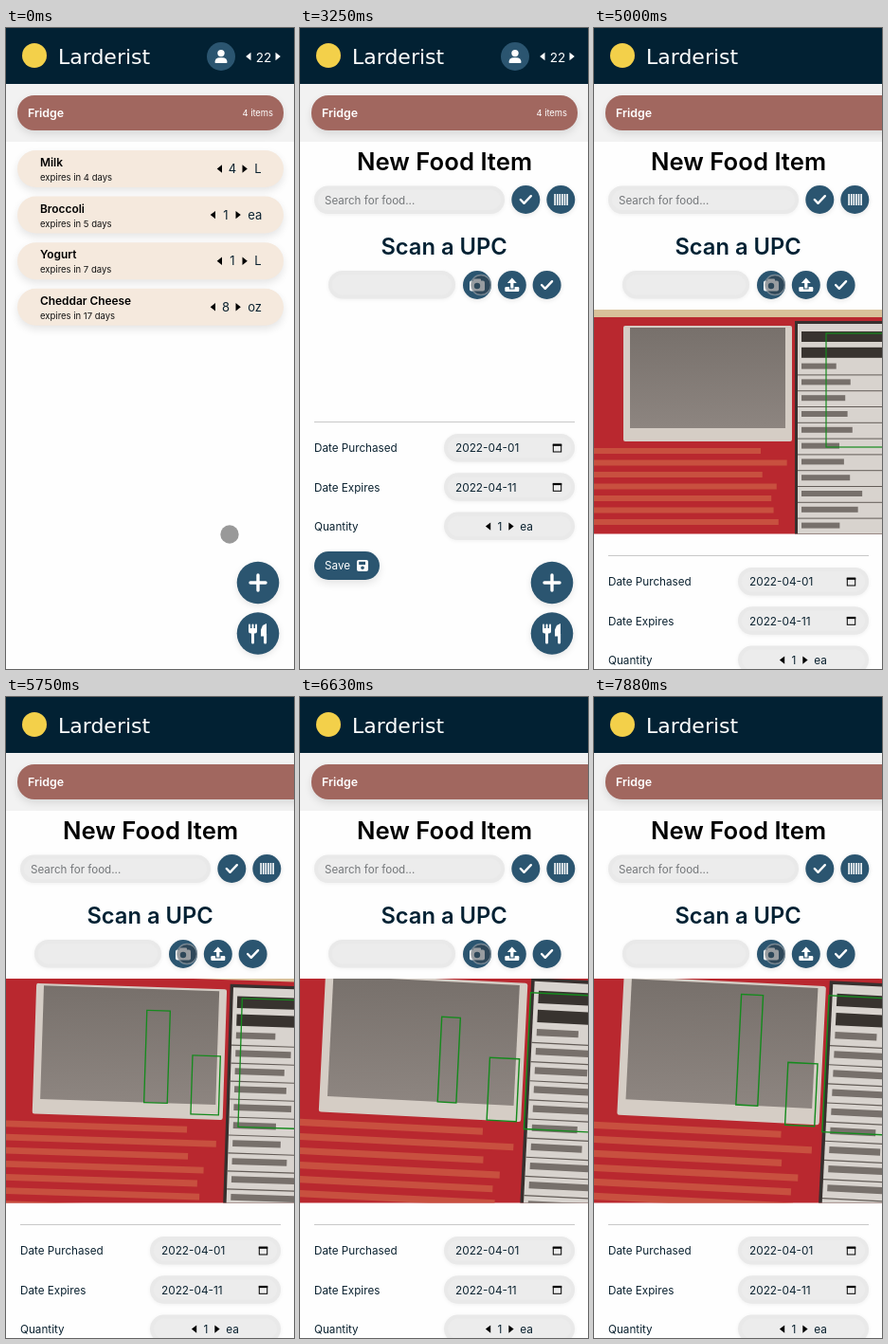
An HTML page with a canvas for the animation above (8000 ms loop, 304 px wide and 676 px high).

```html
<!DOCTYPE html>
<html lang="en">
<head>
<meta charset="utf-8">
<title>Pantry list</title>
<style>
html, body { margin: 0; width: 100%; height: 100%; overflow: hidden; background: #fff; }
canvas { display: block; width: 304px; height: 676px; }
</style>
</head>
<body>
<canvas id="stage"></canvas>
<script>
const W = 304, H = 676, LOOP = 8000, STEP = 125, LIVE = 4250;
const NAVY = '#022133', BLUE = '#2b5570', INK = '#0b2230', PAPER = '#fefefe';
const UI = 'Inter, "Open Sans", sans-serif';
const canvas = document.getElementById('stage');
const c = canvas.getContext('2d');
const dpr = window.devicePixelRatio || 1;
canvas.width = W * dpr;
canvas.height = H * dpr;

const clamp = v => Math.max(0, Math.min(1, v));
const ease = k => k * k * (3 - 2 * k);
const span = (t, a, b) => ease(clamp((t - a) / (b - a)));
const random = seed => {
  const v = Math.sin(seed * 12.9898) * 43758.5453;
  return v - Math.floor(v);
};

function rect(x, y, w, h, color) {
  c.fillStyle = color;
  c.fillRect(x, y, w, h);
}

function pill(x, y, w, h, color, r = h / 2) {
  c.beginPath();
  c.roundRect(x, y, w, h, r);
  c.fillStyle = color;
  c.fill();
}

function disc(x, y, r, color) {
  c.beginPath();
  c.arc(x, y, r, 0, Math.PI * 2);
  c.fillStyle = color;
  c.fill();
}

function poly(points, color) {
  c.beginPath();
  points.forEach(([x, y]) => c.lineTo(x, y));
  c.closePath();
  c.fillStyle = color;
  c.fill();
}

function line(points, color, width) {
  c.beginPath();
  points.forEach(([x, y]) => c.lineTo(x, y));
  c.strokeStyle = color;
  c.lineWidth = width;
  c.lineCap = c.lineJoin = 'round';
  c.stroke();
}

function text(s, x, y, size, { color = INK, weight = 400, align = 'left', font = UI } = {}) {
  c.font = `${weight} ${size}px ${font}`;
  c.fillStyle = color;
  c.textAlign = align;
  c.fillText(s, x, y);
}

function shadowed(draw, blur = 8, dy = 4, alpha = 0.1) {
  c.save();
  c.shadowColor = `rgba(0,0,0,${alpha})`;
  c.shadowBlur = blur * dpr;
  c.shadowOffsetY = dy * dpr;
  draw();
  c.restore();
}

const arrow = (x, y, dir, color = '#000') =>
  poly([[x - 2.5 * dir, y - 4.2], [x + 2.8 * dir, y], [x - 2.5 * dir, y + 4.2]], color);

const icons = {
  check() { line([[-5.5, 0], [-1.8, 3.8], [5.5, -3.8]], '#fff', 2.4); },
  bars() { for (let i = 0; i < 6; i++) rect(-7 + i * 2.6, -6, 1.6, 12, '#fff'); },
  camera() {
    pill(-8, -4.5, 16, 11, '#fff', 2);
    pill(-4, -6.5, 8, 4, '#fff', 1);
    disc(0, 1, 3.2, BLUE);
  },
  upload() {
    poly([[0, -7.5], [5, -2], [-5, -2]], '#fff');
    pill(-7.5, 2, 15, 5, '#fff', 1.2);
    rect(-2.8, 1.5, 5.6, 3, BLUE);
    rect(-1.6, -3, 3.2, 6.5, '#fff');
  },
  plus() {
    line([[-8, 0], [8, 0]], '#fff', 3.4);
    line([[0, -8], [0, 8]], '#fff', 3.4);
  },
  cutlery() {
    for (let x = -9; x < 0; x += 3.5) line([[x, -9], [x, -4]], '#fff', 2);
    pill(-10, -5.5, 9, 5.5, '#fff', 2.5);
    line([[-5.5, -2], [-5.5, 9.5]], '#fff', 3);
    poly([[9, -10.5], [9, 3], [3, 3], [3, -4], [5, -8.5]], '#fff');
    line([[7.6, 1], [7.6, 9.5]], '#fff', 3);
  },
  person() {
    disc(0, -3.4, 3.7, '#fff');
    pill(-6.5, 1.2, 13, 5.8, '#fff', [5, 5, 1, 1]);
  },
  save() {
    pill(-6, -6, 12, 12, '#fff', 2);
    rect(-3.8, -4.2, 6.8, 3.2, BLUE);
    disc(0, 2.3, 1.8, BLUE);
  },
  calendar() {
    c.strokeStyle = '#000';
    c.lineWidth = 1;
    c.strokeRect(-4.2, -3.6, 8.4, 7.6);
    rect(-4.7, -4.4, 9.4, 2.2, '#000');
  }
};

function icon(name, x, y) {
  c.save();
  c.translate(x, y);
  icons[name]();
  c.restore();
}

function button(name, x, y, r = 15) {
  shadowed(() => disc(x, y, r, BLUE), r / 3, r / 10);
  icon(name, x, y);
}

function stepper(x, y, count, unit, size) {
  const gap = size + 0.5;
  arrow(x - gap, y, -1);
  text(count, x, y + size * 0.36, size, { align: 'center' });
  arrow(x + gap - 0.5, y, 1);
  text(unit, x + gap * 1.72, y + size * 0.36, size);
}

function header(wide) {
  rect(0, 0, W, 59, NAVY);
  disc(30, 29, 13, '#f3d04a');
  text('Larderist', 55, 38, 22, { color: '#fff', font: '"DejaVu Sans", sans-serif' });
  if (!wide) {
    disc(227, 30, 15, BLUE);
    icon('person', 227, 30);
    arrow(256, 30, -1, '#fff');
    text('22', 272, 35.5, 13.5, { color: '#fff', align: 'center' });
    arrow(287, 30, 1, '#fff');
  }
  rect(0, 59, W, 61, '#f2f2f2');
  shadowed(() => pill(12, 71, wide ? 400 : 281, 37, '#a1675f', 18));
  text('Fridge', 23, 94, 12.4, { color: '#fff', weight: 600 });
  if (!wide) text('4 items', 282, 93, 9.4, { color: '#fff', align: 'right' });
}

const foods = [
  ['Milk', 4, 4, 'L'], ['Broccoli', 5, 1, 'ea'],
  ['Yogurt', 7, 1, 'L'], ['Cheddar Cheese', 17, 8, 'oz']
];

function foodList() {
  foods.forEach(([name, days, count, unit], i) => {
    const y = 129 + i * 48.6;
    shadowed(() => pill(12, y, 281, 39, '#f5e9dd'));
    text(name, 36, y + 17, 11.9, { color: '#000', weight: 600 });
    text(`expires in ${days} days`, 36, y + 32, 9.5, { color: '#111' });
    stepper(246 - 7 * unit.length, y + 19.5, count, unit, 13);
  });
}

function field(x, y, w) {
  shadowed(() => pill(x, y, w, 29.5, '#e9e9e9'), 4, 1, 0.06);
  pill(x + 4, y + 4, w - 8, 21.5, '#ececec');
}

function formRows(dy) {
  rect(15, 207 + dy, 275, 1, '#c8c8c8');
  ['Date Purchased', 'Date Expires', 'Quantity'].forEach((label, i) => {
    const y = 235 + i * 41.3 + dy;
    text(label, 15, y + 4.2, 11.7);
    field(152, y - 15, 138);
    if (i < 2) {
      text(`2022-04-${i}1`, 164, y + 4.2, 11.8);
      icon('calendar', 271.5, y);
    } else {
      stepper(211, y, 1, 'ea', 11.8);
    }
  });
  shadowed(() => pill(15, 344 + dy, 69, 30, BLUE));
  text('Save', 26, 363.2 + dy, 11.7, { color: '#fff' });
  icon('save', 66, 359 + dy);
}

function scanner(show, dy) {
  c.save();
  c.beginPath();
  c.rect(0, 200, W, 7 + dy);
  c.clip();
  c.globalAlpha *= show;
  text('Scan a UPC', 152, 239, 23.7, { color: NAVY, weight: 600, align: 'center' });
  field(30, 256, 134);
  ['camera', 'upload', 'check'].forEach((name, i) => button(name, 187 + i * 36.8, 271));
  c.restore();
}

function form(open, dy) {
  rect(0, 120, W, H - 120, PAPER);
  text('New Food Item', 152.5, 149.5, 25.7, { color: '#000', weight: 600, align: 'center' });
  field(15, 166.5, 201);
  text('Search for food...', 26, 185.7, 11.6, { color: '#74777a' });
  button('check', 238.3, 181);
  button('bars', 275.3, 181);
  if (open > 0) scanner(open, dy);
  formRows(dy);
}

function packet() {
  rect(-90, -60, 480, 390, '#b9282f');
  rect(-90, -60, 480, 51, '#d8c19a');
  pill(0, 0, 178, 122, '#d5cdc5', 2);
  const shade = c.createLinearGradient(0, 0, 0, 108);
  shade.addColorStop(0, '#77706b');
  shade.addColorStop(1, '#8d8580');
  rect(7, 2, 164, 106, shade);
  for (let i = 0; i < 7; i++) rect(-60, 129 + i * 12.5, 205 + 30 * random(i), 6, '#c8503f');
  rect(181, -5, 240, 330, '#37302e');
  rect(184, -2, 240, 330, '#d8d3ce');
  for (let i = 0; i < 14; i++) {
    const y = 6 + i * 16.8, title = i < 2;
    rect(188, y, title ? 120 : 35 + 30 * random(i), title ? 11 : 6, title ? '#38332f' : '#77706b');
    if (i > 2) rect(184, y - 5, 180, 1, '#635c57');
  }
}

function outline(x, y, w, h) {
  c.strokeStyle = '#158a1d';
  c.lineWidth = 1.2;
  c.strokeRect(x, y, w, h);
}

// Detected regions flicker from step to step
function marks(n, zoom) {
  const top = 10 + 42 * random(n);
  if (zoom > 0) outline(104, top, 14 + 14 * random(n + 7), 108 - top);
  if (random(n + 3) < zoom * 0.6) outline(148, 60 + 22 * random(n + 5), 26, 55);
  outline(181 + 33 * (1 - zoom), 8, 130, 120);
}

// The hand moves closer, then sways sideways
function video(t) {
  const zoom = span(t, 5000, 6250);
  const sway = zoom * Math.cos((t - 6250) / 1050 * Math.PI);
  c.save();
  c.beginPath();
  c.rect(0, 297, W, 236.5);
  c.clip();
  c.translate(
    31 + 13 * (1 - span(t, LIVE, 5000)) + 3 * zoom - 16 * sway,
    314 - 18 * zoom - 11 * Math.max(0, sway)
  );
  c.rotate(0.05 * zoom);
  c.scale(1 + 0.2 * zoom, 1 + 0.2 * zoom);
  packet();
  marks(Math.floor(t / STEP), zoom);
  c.restore();
}

// Three moves: add button, bar reader, camera
function cursor(t) {
  const add = span(t, 0, 625), read = span(t, 1375, 2125), snap = span(t, 2500, 3125);
  const x = 236 + 31 * add - 76 * snap;
  const y = 534 + 53 * add - 403 * read + 87 * snap;
  const pressed = (t >= 1000 && t < 1500) || t >= 3125;
  if (!pressed) return disc(x, y, 9.7, 'rgba(128,128,128,.8)');
  disc(x, y, 10.5, 'rgba(50,58,66,.5)');
  c.beginPath();
  c.arc(x, y, 10.5, 0, Math.PI * 2);
  c.strokeStyle = 'rgba(165,170,175,.6)';
  c.lineWidth = 1.3;
  c.stroke();
}

function draw(t) {
  const live = t >= LIVE;
  const shown = span(t, 500, 875);
  const open = span(t, 2250, 3125);

  c.setTransform(dpr, 0, 0, dpr, 0, 0);
  rect(0, 0, W, H, PAPER);
  header(live);
  if (shown < 1) foodList();
  if (shown > 0) {
    c.save();
    c.globalAlpha = shown;
    form(open, live ? 349 : 208 * open);
    c.restore();
  }
  if (live) {
    video(t);
  } else {
    button('plus', 266, 585, 22.3);
    button('cutlery', 266, 638.5, 22.3);
  }
  cursor(t);
}

function frame(now) {
  draw(Math.floor((now % LOOP) / STEP) * STEP);
  requestAnimationFrame(frame);
}
requestAnimationFrame(frame);
</script>
</body>
</html>
```
